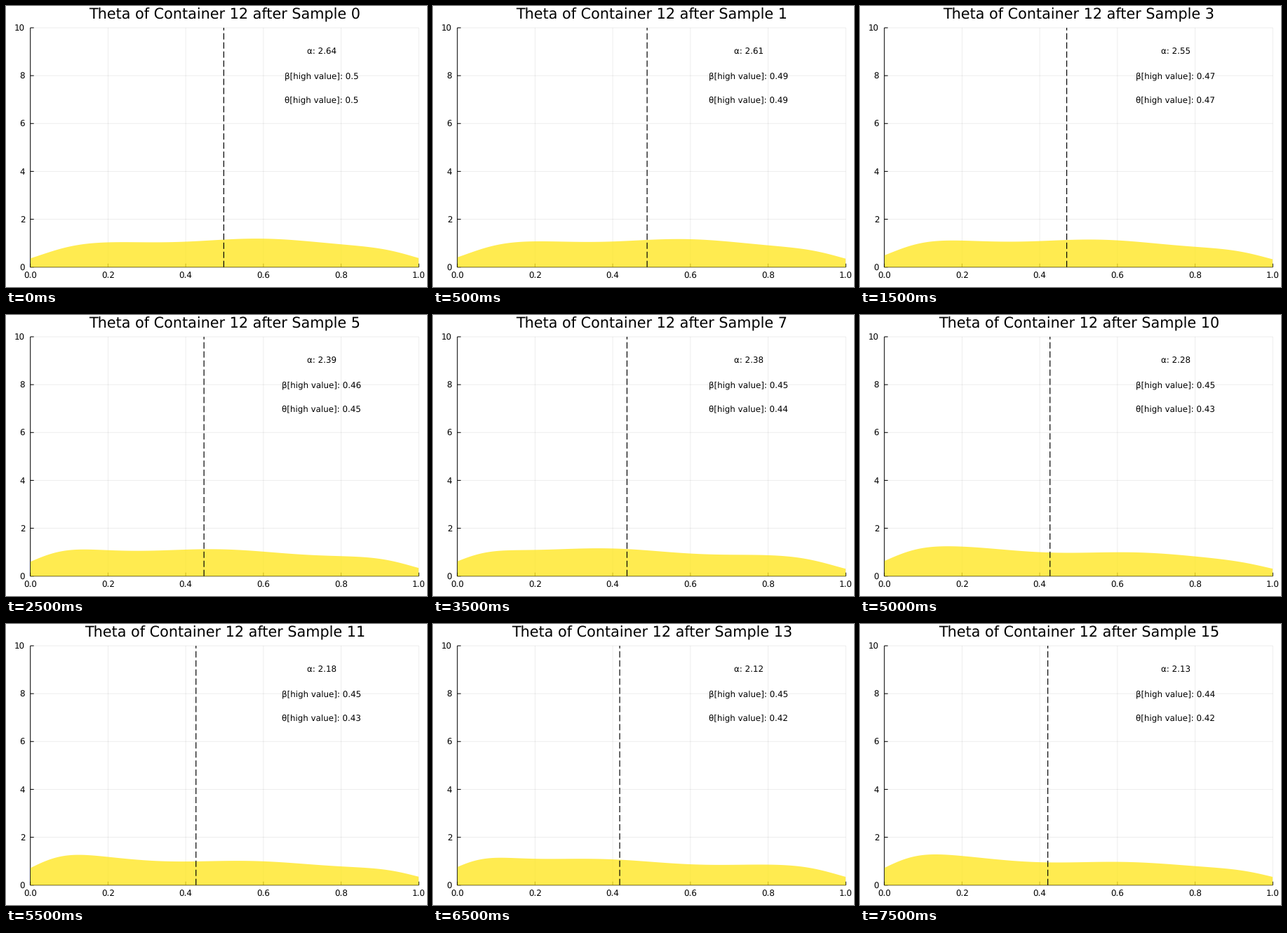
These frames come from a looping animation (600x400 px, 8 s). A matplotlib script:

```python
import numpy as np
import matplotlib.pyplot as plt
from matplotlib.animation import FuncAnimation
from matplotlib.patches import Polygon

W, H, DPI = 600, 400, 100
PX = 72 / DPI                                    # points per pixel
LEFT, RIGHT, TOP, BOTTOM = 34.7, 588.3, 31.0, 371.7
SMALL, LARGE = 11.9 * PX, 20.8 * PX

plt.rcParams.update({"font.family": "DejaVu Sans", "text.hinting": "none"})

# Key points of the random walk; the rest follows from formulas
SAMPLES = [0, 3, 5, 9, 11, 13, 15]
ALPHA = [2.64, 2.55, 2.39, 2.37, 2.18, 2.12, 2.13]
THETA = [0.498, 0.4695, 0.447, 0.4265, 0.4264, 0.418, 0.4208]

BANDWIDTH = 0.07
GRID = np.linspace(0, 1, 201)
MIDS = (np.arange(500) + 0.5) / 500
KERNEL = np.exp(-((GRID[:, None] - MIDS) / BANDWIDTH) ** 2 / 2)
KERNEL /= BANDWIDTH * np.sqrt(2 * np.pi)


def beta_at(n):
    return 0.442 + 0.058 * np.exp(-n / 4.6)


def density(n, alpha, beta):
    """Beta density smoothed by a Gaussian kernel, with a drifting ripple."""
    a, b = alpha * beta - 0.08, alpha * (1 - beta) - 0.08
    weights = MIDS ** (a - 1) * (1 - MIDS) ** (b - 1)
    smooth = KERNEL @ (weights / weights.sum())
    crest = 0.6 - 0.0041 * n**2
    return smooth * (1 + 0.06 * np.cos(2 * np.pi * (GRID - crest) / 0.48))


def px_x(v):
    return LEFT + v * (RIGHT - LEFT)


def px_y(v):
    return BOTTOM - v / 10 * (BOTTOM - TOP)


fig = plt.figure(figsize=(W / DPI, H / DPI), dpi=DPI, facecolor="white")
ax = fig.add_axes([LEFT / W, 1 - BOTTOM / H,
                   (RIGHT - LEFT) / W, (BOTTOM - TOP) / H])
ax.set(xlim=(0, 1), ylim=(0, 10))
ax.set_axis_off()


def label(x, y, text="", size=SMALL, ha="center"):
    """Text with its baseline at pixel (x, y), counted from the top left."""
    return fig.text(x / W, 1 - y / H, text, size=size, ha=ha, va="baseline")


# Grid, axes and inward ticks
xs, ys = np.arange(6) / 5, np.arange(0, 11, 2)
tick_w, tick_h = 5 / (RIGHT - LEFT), 50 / (BOTTOM - TOP)
line = dict(linewidth=PX, snap=False, clip_on=False, zorder=1)
for lines, at, low, end, tick in ((ax.vlines, xs, 0, 10, tick_h),
                                  (ax.hlines, ys, 0, 1, tick_w)):
    lines(at, low, end, color="black", alpha=0.07, **line)
    lines(0, low, end, color="black", **line)
    lines(at, low, tick, color="black", **line)
for x, y in zip(xs, ys):
    label(px_x(x), 387.4, f"{x:.1f}")
    label(27.2, px_y(y) + 4.7, str(y), ha="right")

title = label(312, 19, size=LARGE)
notes = [label(px_x(0.75), px_y(v) + 4) for v in (9, 8, 7)]
area = Polygon([(0, 0), (1, 0)], facecolor="#ffe724", alpha=0.8,
               linewidth=0, snap=False, zorder=2)
ax.add_patch(area)
mean, = ax.plot([0, 0], [0, 10], color="black", linewidth=1.2 * PX,
                linestyle=(0, (7.5, 3.3)), dash_capstyle="butt",
                snap=False, zorder=3)


def draw(n):
    alpha, theta = (float(np.interp(n, SAMPLES, v)) for v in (ALPHA, THETA))
    beta = float(beta_at(n))
    curve = np.column_stack([GRID, density(n, alpha, beta)])
    area.set_xy(np.vstack([(0, 0), curve, (1, 0)]))
    mean.set_xdata([theta, theta])
    title.set_text(f"Theta of Container 12 after Sample {n}")
    names = "α", "β[high value]", "θ[high value]"
    for note, name, v in zip(notes, names, (alpha, beta, theta)):
        note.set_text(f"{name}: {round(v, 2)}")
    return [area, mean, title, *notes]


anim = FuncAnimation(fig, draw, frames=16, interval=500,
                     repeat=True, repeat_delay=0, blit=False)
plt.show()
```
